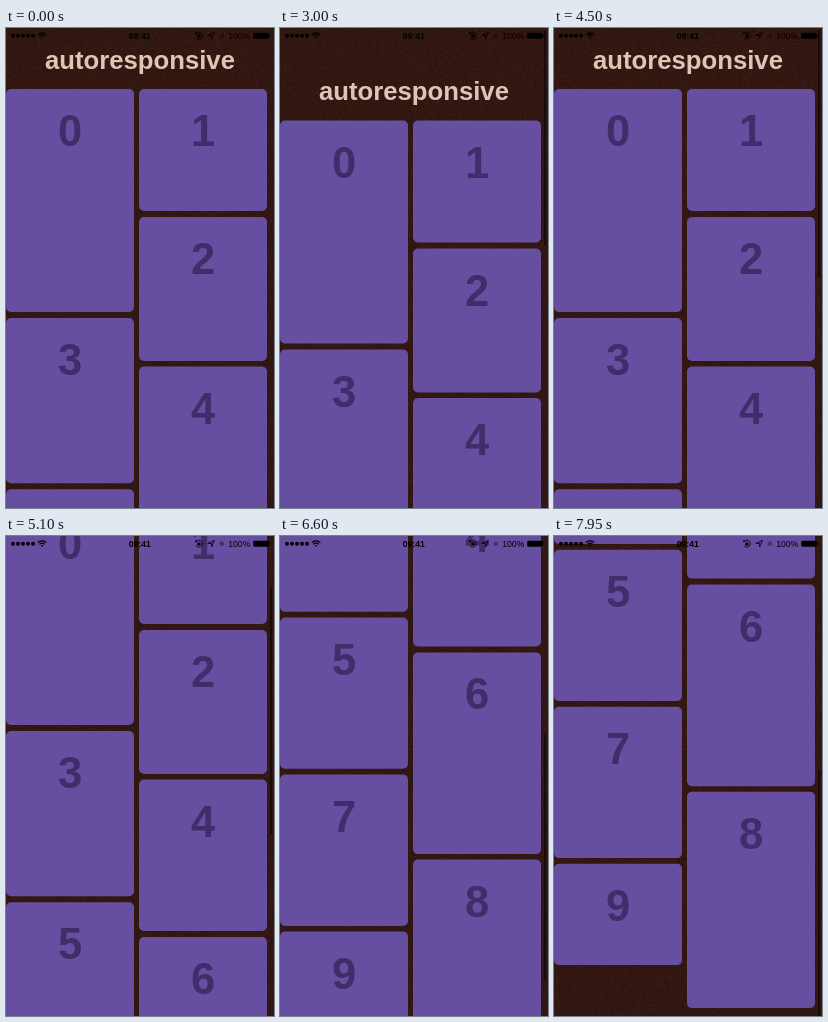
Recreate the animation shown at these times as an HTML page with a canvas. Size 268 by 480 pixels, loop 8 s.

```html
<!DOCTYPE html>
<html lang="en">
<head>
<meta charset="utf-8">
<title>autoresponsive</title>
<style>
  html, body { margin: 0; width: 100%; height: 100%; overflow: hidden; background: #321712; }
  #stage { position: relative; width: 268px; height: 480px; overflow: hidden; }
  #stage > * { position: absolute; left: 0; top: 0; }
  svg { display: block; overflow: visible; }
  text { font-family: "Liberation Sans", Arial, sans-serif; text-anchor: middle; }
  .title { font-weight: 700; font-size: 25.7px; fill: #dfc5b5; }
  .num { font-weight: 700; font-size: 43.5px; fill: #412d6a; }
  .box { fill: #664fa0; }
  .status text { font-size: 8.6px; }
</style>
</head>
<body>
<div id="stage">
  <canvas id="leather" width="268" height="480"></canvas>
  <svg width="268" height="480">
    <g id="page">
      <text class="title" x="134" y="40.6">autoresponsive</text>
    </g>
    <rect id="bar" x="264" width="2" rx="1" fill="#000" fill-opacity=".5"/>
    <g class="status" fill="#000">
      <g id="dots"></g>
      <g fill="none" stroke="#000" stroke-width="1.2">
        <path d="M31.8 6.6a6 6 0 0 1 8.6 0M33.4 8.3a3.7 3.7 0 0 1 5.4 0"/>
      </g>
      <path d="M34.8 9.5a1.9 1.9 0 0 1 2.6 0L36.1 10.9z"/>
      <text x="133.8" y="10.8" font-weight="700">09:41</text>
      <path d="M190 5.3a3.6 3.6 0 1 1-.3 4.2" fill="none" stroke="#000" stroke-width=".8"/>
      <path d="M189 4l.3 2.6 2.2-.9z"/>
      <rect x="191.3" y="7" width="3.2" height="2.4" rx=".3"/>
      <path d="M192 7.2v-.7a.9.9 0 0 1 1.8 0v.7" fill="none" stroke="#000" stroke-width=".6"/>
      <path d="M208.4 4.4L205.6 11V7.4H201.8z" fill="none" stroke="#000" stroke-width=".8"/>
      <rect x="213.7" y="5.7" width="4" height="4" opacity=".35"/>
      <text x="233.3" y="10.8">100%</text>
      <rect x="247.2" y="4.7" width="15.6" height="6" rx="1.3"/>
      <rect x="263.3" y="6.6" width="1.1" height="2.2" rx=".5"/>
    </g>
  </svg>
</div>
<script>
const LOOP = 8000, STEP = 150, VIEW = 480, PAGE = 928;
const $ = id => document.getElementById(id);

function add(parent, tag, attrs, label) {
  const el = document.createElementNS("http://www.w3.org/2000/svg", tag);
  for (const k in attrs) el.setAttribute(k, attrs[k]);
  if (label !== undefined) el.textContent = label;
  parent.append(el);
}

// Cards: label, column, top, height
const cards = [
  [0, 0, 61, 223], [1, 1, 61, 122], [2, 1, 189, 144], [3, 0, 290, 165.3],
  [4, 1, 338.6, 151.4], [5, 0, 461.2, 151.2], [6, 1, 496, 201.7],
  [7, 0, 618.2, 151.3], [8, 1, 703.2, 216.3], [9, 0, 775.2, 101.3]
];
for (const [label, col, y, height] of cards) {
  const x = col * 133;
  add($("page"), "rect", { class: "box", x, y, width: 128, height, rx: 5 });
  add($("page"), "text", { class: "num", x: x + 64, y: y + 57 }, label);
}
for (let i = 0; i < 5; i++) add($("dots"), "circle", { cx: 7 + i * 5, cy: 7.7, r: 2 });

// Seeded grain for the leather background
function paintLeather() {
  const ctx = $("leather").getContext("2d");
  const img = ctx.createImageData(268, 480);
  let seed = 7;
  for (let i = 0; i < img.data.length; i += 4) {
    seed = (seed * 1664525 + 1013904223) % 4294967296;
    const n = (seed / 4294967296 - 0.5) * 12;
    img.data.set([50 + n, 23 + n * 0.7, 18 + n * 0.6, 255], i);
  }
  ctx.putImageData(img, 0, 0);
}

// Scroll offset over time: a pull down, a bounce back, then a flick to the end
const keys = [
  [0, 0], [2250, 0], [2550, -8], [3000, -31.5], [3300, -39], [3600, -27],
  [4050, -4], [4350, 0], [4500, 0], [4800, 30], [5100, 95], [5400, 171],
  [5700, 243], [6000, 301], [6300, 345], [6600, 379.6], [6900, 405],
  [7200, 424], [7500, 437], [7950, 447.4], [8000, 447.4]
];
const slope = i => (keys[i + 1][1] - keys[i][1]) / (keys[i + 1][0] - keys[i][0]);
function tangent(i) {
  if (i === 0 || i === keys.length - 1) return 0;
  const a = slope(i - 1), b = slope(i);
  return a * b <= 0 ? 0 : 2 * a * b / (a + b);
}
function scrollAt(t) {
  let i = 0;
  while (i < keys.length - 2 && t >= keys[i + 1][0]) i++;
  const [t0, y0] = keys[i], [t1, y1] = keys[i + 1];
  const d = t1 - t0, u = (t - t0) / d, v = 1 - u;
  return v * v * (1 + 2 * u) * y0 + u * u * (3 - 2 * u) * y1 +
    d * u * v * (v * tangent(i) - u * tangent(i + 1));
}

function draw(t) {
  const y = scrollAt(t);
  $("page").setAttribute("transform", `translate(0 ${-y})`);
  const ratio = VIEW / PAGE;
  $("bar").setAttribute("y", 2 + Math.max(y, 0) * ratio);
  $("bar").setAttribute("height", VIEW * ratio - 1 + Math.min(y, 0));
  $("bar").setAttribute("opacity", Math.min(1, Math.max(0, (t - 2100) / 300)));
}

const start = performance.now();
function tick() {
  const t = (performance.now() - start) % LOOP;
  draw(Math.floor(t / STEP) * STEP);
  requestAnimationFrame(tick);
}
paintLeather();
tick();
</script>
</body>
</html>
```
